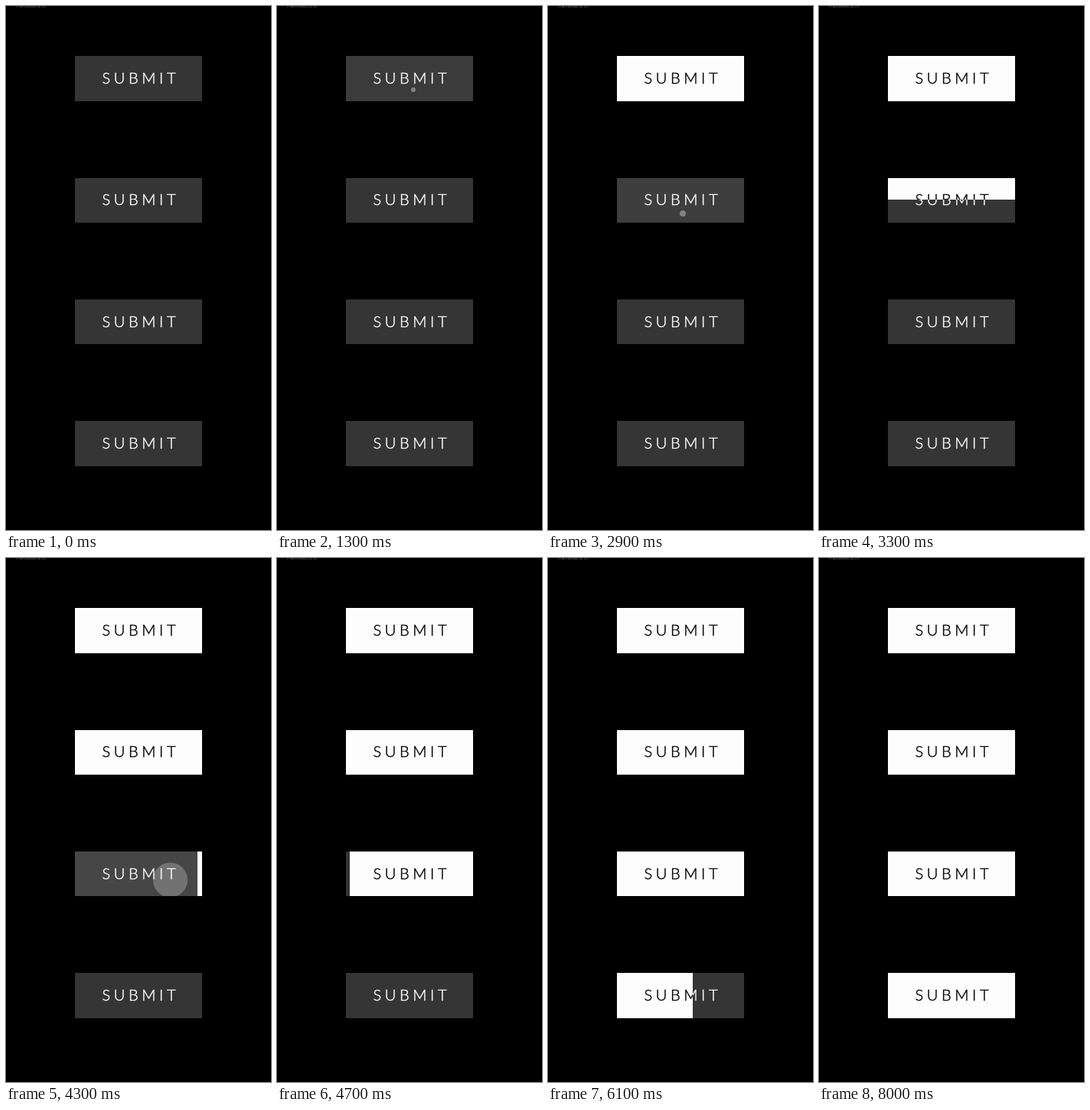
An HTML page that plays this animation: 346x682 px, repeating every 8200 ms.

```html
<!DOCTYPE html>
<html lang="en">
<head>
<meta charset="utf-8">
<title>Submit buttons</title>
<style>
  html, body { margin: 0; width: 100%; height: 100%; overflow: hidden; background: #000; }
  svg { display: block; width: 346px; height: 682px; }
  .label {
    font: 300 20px Lato, "Open Sans", sans-serif;
    letter-spacing: 4.65px;
    stroke-width: 0.45px;
  }
  .caption { font: 6.5px "Open Sans", sans-serif; fill: #6c6c6c; }
</style>
</head>
<body>
<svg id="stage" viewBox="0 0 346 682">
  <rect width="346" height="682" fill="#000"/>
  <text class="caption" x="12" y="1.6">Transitions in</text>
</svg>
<script>
const LOOP = 8200, STEP = 100, FILL_TIME = 520, RIPPLE_TIME = 300;
const LEFT = 90, WIDTH = 166, HEIGHT = 58.45, TOP = 65.7, PITCH = 158.3;

// press: finger down, fill: wipe start, (x, y): touch point inside the button
const buttons = [
  { from: 'bottom', press: 1285, fill: 1348, x: 88, y: 44 },
  { from: 'top', press: 2880, fill: 3045, x: 86, y: 46 },
  { from: 'right', press: 4187, fill: 4237, x: 124.5, y: 37 },
  { from: 'left', press: 5592, fill: 5807, x: 102.5, y: 47 }
];

const stage = document.getElementById('stage');
const clamp = v => Math.max(0, Math.min(1, v));
const ease = v => (1 - Math.cos(Math.PI * clamp(v))) / 2;

function set(el, attrs) {
  for (const key in attrs) el.setAttribute(key, attrs[key]);
  return el;
}

function add(parent, tag, attrs) {
  const el = document.createElementNS('http://www.w3.org/2000/svg', tag);
  return parent.appendChild(set(el, attrs));
}

function addLabel(parent, y, color, clip) {
  const text = add(parent, 'text', { class: 'label', x: 35.4, y, fill: color, stroke: color });
  text.textContent = 'SUBMIT';
  if (clip) set(text, { 'clip-path': clip });
}

function build(b, i) {
  // button edges sit on whole pixels
  const top = TOP + PITCH * i, y = Math.floor(top);
  b.height = Math.floor(top + HEIGHT) - y;
  const box = { width: WIDTH, height: b.height };
  const base = top - y + 35.4;
  const g = add(stage, 'g', { transform: `translate(${LEFT} ${y})` });
  add(add(g, 'clipPath', { id: 'box' + i }), 'rect', box);
  b.clip = add(add(g, 'clipPath', { id: 'wipe' + i }), 'rect', box);

  add(g, 'rect', { ...box, fill: '#353535' });
  b.glow = add(g, 'rect', { ...box, fill: '#fff' });
  const inner = add(g, 'g', { 'clip-path': `url(#box${i})` });
  b.ripple = add(inner, 'circle', { cx: b.x, cy: b.y, fill: '#fff' });
  addLabel(g, base, '#fff');
  b.cover = add(g, 'rect', { ...box, fill: '#fdfdfd' });
  addLabel(g, base, '#000', `url(#wipe${i})`);
}

function wipe({ from, height }, p) {
  const w = Math.round(WIDTH * p), h = Math.round(height * p);
  if (from === 'bottom') return { x: 0, y: height - h, width: WIDTH, height: h };
  if (from === 'top') return { x: 0, y: 0, width: WIDTH, height: h };
  if (from === 'right') return { x: WIDTH - w, y: 0, width: w, height };
  return { x: 0, y: 0, width: w, height };
}

function draw(time) {
  for (const b of buttons) {
    const area = wipe(b, ease((time - b.fill) / FILL_TIME));
    set(b.cover, area);
    set(b.clip, area);

    const age = time - b.press;
    const on = age > 0 && age < RIPPLE_TIME;
    const left = 1 - age / RIPPLE_TIME;
    const glow = 0.083 * Math.min(1, age / 40, left * 2);
    set(b.ripple, { r: on ? age * 0.2 : 0, 'fill-opacity': on ? 0.38 * left : 0 });
    set(b.glow, { 'fill-opacity': on ? glow : 0 });
  }
}

buttons.forEach(build);
draw(0);

const start = performance.now();
function tick() {
  const t = (performance.now() - start) % LOOP;
  draw(Math.floor(t / STEP) * STEP);
  requestAnimationFrame(tick);
}
requestAnimationFrame(tick);
</script>
</body>
</html>
```
